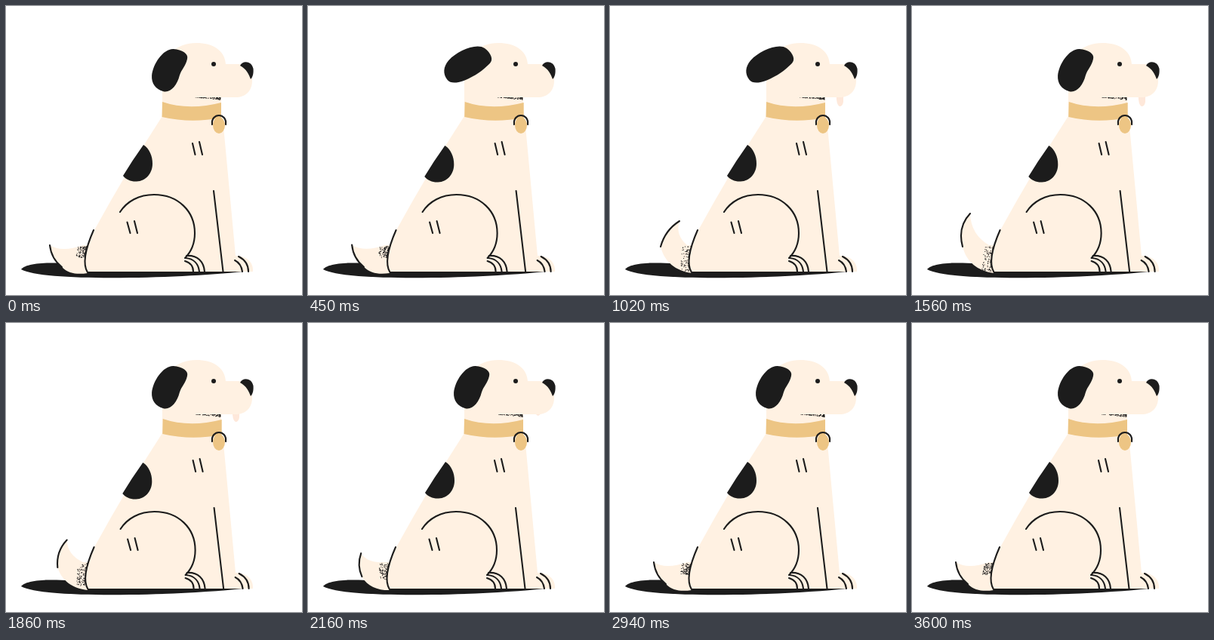
These frames come from a looping animation (392x383 px, 3660 ms). An HTML page:

```html
<!DOCTYPE html>
<html lang="en">
<head>
<meta charset="utf-8">
<title>Sitting dog</title>
<style>
html, body { margin: 0; width: 100%; height: 100%; overflow: hidden; background: #fff; }
svg { display: block; width: 392px; height: 383px; }
.skin { fill: #fff1e2; }
.ink { fill: #1c1c1c; }
.gold { fill: #edc584; }
.line { fill: none; stroke: #1c1c1c; stroke-width: 2.1; stroke-linecap: round; }
</style>
</head>
<body>
<svg viewBox="0 0 392 383">
  <path class="ink" d="M20 349C28 338 75 339 108 344V352H314C230 361 50 366 20 349Z"/>
  <path id="tail" class="skin"/>
  <path id="tailDots" class="ink"/>
  <path id="tailLine" class="line"/>
  <path id="tongue" fill="#fee8da" d="M299 108H309V127Q308 133 304 133Q301 132 300 124Z"/>
  <path class="skin" d="M207 146Q162 215 117 297Q104 326 105 343L108 352H327C328 339 318 331 304 331L289 170L286 147Z"/>
  <path class="skin" d="M207 148V98H285V148Z"/>
  <path id="chinDots" class="ink"/>
  <path class="skin" d="M207 121V92C207 66 226 49 252 49C274 49 290 59 291 77H308C319 77 326 86 326 99C326 113 317 121 304 121Z"/>
  <path class="ink" d="M310 79C313 72 325 72 327.5 83C328 89 327 94 324 97C322 91 318 83 310 79Z"/>
  <circle class="ink" cx="275" cy="77" r="3"/>
  <path id="ear" class="ink"/>
  <path id="collar" class="gold" d="M207 127Q242 139 285 128V148Q245 156 206.5 147Z"/>
  <ellipse class="gold" cx="282" cy="158" rx="8" ry="11"/>
  <path class="line" d="M273 157C271 141 293 141 291 157"/>
  <path id="spot" class="ink" d="M182 184C190 189 194 199 194 209C194 222 185 232 173 232.5C166 233 159 230 155 225Q167 205 182 184Z"/>
  <g id="lines" class="line">
    <path d="M247 182L250.5 197M256 180L260 197M160.500 286.500L164.500 301M170 285L174 301"/>
    <path d="M275 245L287.500 352"/>
    <path d="M151 273C160 259 176 250 196 250C228 250 250 272 250 301C250 314 246 325 237 334"/>
    <path d="M116 297C105 322 101 342 108 353"/>
    <path d="M239 331C254 330 262 339 263 352M238 334C249 335 255 342 256 352M237 338C244 340 248 345 248 352"/>
    <path d="M308 332C316 336 321 342 321 352M303 337C309 340 312 345 313 352"/>
  </g>
</svg>
<script>
const LOOP = 3660, BOIL = 120;
const set = (id, name, value) => document.getElementById(id).setAttribute(name, value);

function smooth(from, to, t) {
  const k = Math.min(1, Math.max(0, (t - from) / (to - from)));
  return k * k * (3 - 2 * k);
}

// 0 -> 1 between a and b, back to 0 between c and d
const bump = (t, a, b, c, d) => smooth(a, b, t) - smooth(c, d, t);

function random(seed) {
  return () => (seed = (seed * 16807) % 2147483647) / 2147483647;
}

function stipple(count, place) {
  let d = '';
  for (let i = 0; i < count; i++) d += `M${place()}h1v1h-1z`;
  return d;
}

function drawEar(lift) {
  set('ear', 'd', `M-5 -28C6 -31 16 -29 16.5 -22C18 -12 ${14 + 5 * lift} -6 ${14.5 + 3 * lift} 2
    C16 16 11 29 1 29.5C-9 30 -17 25 -20 15C-24 0 -18 -24 -5 -28Z`);
  set('ear', 'transform', `translate(${217 - 6 * lift} ${85 - 7 * lift})
    rotate(${20 + 35 * lift}) scale(${1 - 0.05 * lift} ${1 + 0.12 * lift})`);
}

function drawTail(t, rnd) {
  const lift = bump(t, 430, 830, 1600, 2550);
  const bend = lift * (0.5 + 0.5 * Math.cos(2 * Math.PI * (t - 1020) / 1080));
  const tip = `${58 + 19 * lift + 15 * bend} ${317 - 42 * lift + 10 * bend}`;
  const outer = `M${tip}Q${60 + 13 * bend} ${335 - 42 * lift + 4 * bend} ${74 - 7 * lift} ${346 - 27 * lift}`;
  set('tailLine', 'd', outer);
  set('tail', 'd', `${outer}C${83 - 11 * lift} ${355 - 16 * lift} ${95 - 8 * lift} ${356 - 5 * lift} 108 354
    L114 317H102Q${74 + 4 * lift + 8 * bend} ${327 - 24 * lift} ${tip}Z`);
  set('tailDots', 'd', stipple(120, () => {
    const v = rnd();
    return [107 - 3 * v - 12 * rnd() ** 2, 318 + v * (15 + 18 * lift)];
  }));
}

function draw(t) {
  const step = Math.floor(t / BOIL), odd = step % 2;
  const rnd = random(7919 * (step + 3));

  drawEar(bump(t, 120, 420, 1080, 1440));
  drawTail(t, rnd);
  set('tongue', 'transform', `translate(0 ${14 * bump(t, 600, 900, 1700, 2400) - 14})`);

  set('chinDots', 'd', stipple(75, () => {
    const u = rnd() ** 2;
    return [283.5 - 33 * u, 120.5 + 3.5 * rnd() * (1 - u)];
  }));

  // hand-drawn wobble
  set('collar', 'transform', `translate(${0.7 * odd} 0)`);
  set('lines', 'transform', `translate(${0.6 * odd} 0)`);
  set('spot', 'transform', `translate(${-0.7 * odd} ${odd})`);
}

const start = performance.now();
function tick() {
  draw((performance.now() - start) % LOOP);
  requestAnimationFrame(tick);
}
tick();
</script>
</body>
</html>
```
